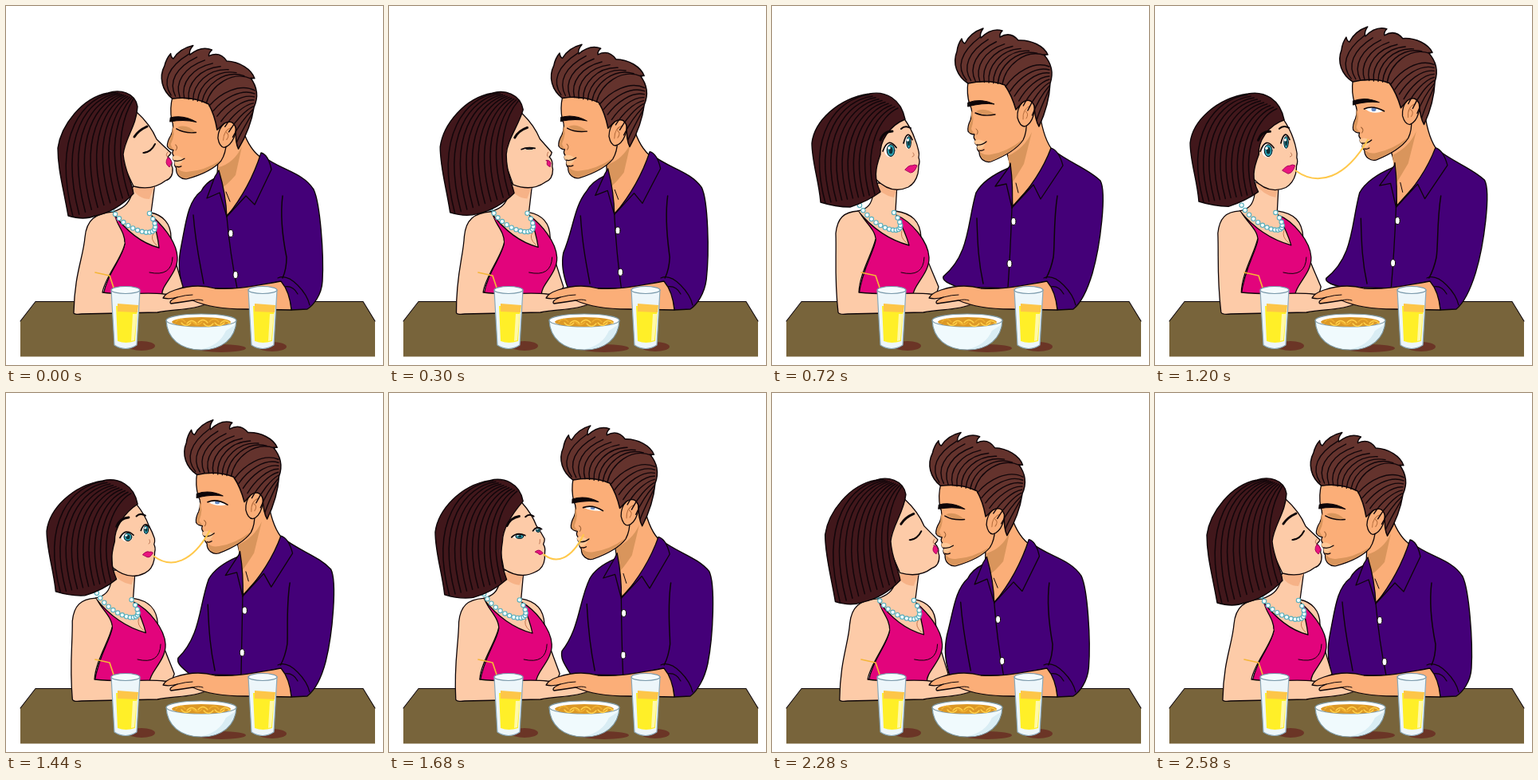
Recreate the animation shown at these times as an HTML page with a canvas. Size 473x450 px, loop 2.64 s.

```html
<!DOCTYPE html>
<html lang="en">
<head>
<meta charset="utf-8">
<title>Dinner kiss</title>
<style>
html, body { margin: 0; width: 100%; height: 100%; overflow: hidden; background: #fff; }
canvas { display: block; }
</style>
</head>
<body>
<canvas id="stage" width="473" height="450"></canvas>
<script>
const ctx = document.getElementById('stage').getContext('2d');
const LOOP = 2640, STEP = 60;
const INK = '#0d0508', SHADE = '#d9955c', TAN = '#fbae78', PEACH = '#fdcba8', SHIRT = '#440078',
  DRESS = '#e2047c', DARK_HAIR = '#41171b', BROWN_HAIR = '#64332d', NOODLE = '#ffc84a';

// Timeline tracks: [time, value] pairs, linear in between
const LEAN = [[0, 0], [180, 0], [480, .6], [720, 1], [1200, 1.06], [1680, .6], [1740, .55], [2040, .17], [2400, .03], [2580, 0]];
const SWAY = [[0, 0], [180, 0], [480, 7], [720, 0], [1200, -5], [1680, 2], [2040, 5], [2580, 0]];
const HER_EYES = [[0, 0], [240, 0], [480, .5], [720, 1], [1200, 1], [1680, .35], [1920, 0]];
const HIS_EYES = [[0, 0], [900, 0], [1200, 1], [1680, .5], [1920, 0]];
const NOODLE_ON = 960, NOODLE_OFF = 2160;

function at(track, t) {
  const i = track.findIndex(k => k[0] > t);
  if (i < 0) return track[track.length - 1][1];
  const [t0, a] = track[i - 1], [t1, b] = track[i];
  return a + (b - a) * (t - t0) / (t1 - t0);
}

// Blend two paths of equal structure
function mix(a, b, k) {
  const numbers = /-?\d+(\.\d+)?/g, target = b.match(numbers);
  let i = 0;
  return a.replace(numbers, v => (+v + (target[i++] - v) * k).toFixed(2));
}

function shape(d, fill, width = 1.3, stroke = INK) {
  const path = new Path2D(d);
  if (fill) { ctx.fillStyle = fill; ctx.fill(path); }
  if (width) { ctx.lineWidth = width; ctx.strokeStyle = stroke; ctx.stroke(path); }
}
const line = (d, width = 1.3, color = INK) => shape(d, null, width, color);

function oval(x, y, rx, ry, fill, width = 0, stroke = INK) {
  ctx.beginPath();
  ctx.ellipse(x, y, rx, ry, 0, 0, 7);
  ctx.fillStyle = fill;
  ctx.fill();
  if (width) { ctx.lineWidth = width; ctx.strokeStyle = stroke; ctx.stroke(); }
}

function strands(first, last, count, width = 1.4) {
  for (let i = 0; i <= count; i++) line(mix(first, last, i / count), width, '#12060a');
}

function table() {
  shape('M37 371H448L463 395V439.5H18V395Z', '#78643b', 0);
  line('M18 395L37 370.5H448L463 395', 1.1);
  oval(170, 426, 17, 6, '#6b3526');
  oval(270, 429, 31, 5, '#6b3526');
  oval(334, 427, 18, 6, '#6b3526');
}

function glass(x) {
  ctx.save();
  ctx.translate(x, 0);
  shape('M-18 356L-14 425Q0 434 14 425L18 356Z', '#edf6fa', 1.2, '#8aa8b8');
  shape('M-12 376H15L12 420Q0 424 -10 420Z', '#ffef28', 0);
  shape('M-10 373L16 375L15 384L-10 383Z', '#fdc648', 0);
  shape('M9 386H14L11 419L7 420Z', '#fff9a8', 0);
  oval(0, 356, 18, 4.5, '#f5fbfd', 1.2, '#7898aa');
  ctx.restore();
}

function bowl() {
  shape('M201 394C202 417 219 431 245 431C271 431 288 417 289 394Z', '#f0fafd', 1.2, '#7f9ba6');
  shape('M276 407C270 420 260 427 246 430C267 431 284 418 287 400Z', '#d9edf4', 0);
  oval(245, 394, 44, 8, '#fff', 1.2, '#7f9ba6');
  oval(245, 396, 37, 6, '#dc9826');
  for (let i = 0; i < 9; i++) {
    const x = 213 + i * 7;
    line(`M${x} ${396 + i % 3}q6 ${i % 2 ? 7 : -7} 12 0`, 1.3, i % 3 ? '#ffd04a' : '#f0b030');
  }
}

function herBody(p) {
  const m = (a, b) => mix(a, b, p);
  shape(m('M160 222L158 235C154 249 146 254 134 258C140 300 150 330 140 372L212 366L222 352C214 325 209 310 207 290C207 272 196 262 182 259L187 222Z',
    'M128 222L127 235C125 249 120 254 108 257C110 300 120 330 120 372L205 366L209 352C198 325 190 310 187 290C186 270 176 260 155 257L157 222Z'), PEACH);
  shape(m('M158 228L187 226Q182 235 180 242Q166 242 158 228Z', 'M127 222L157 228Q154 236 153 240Q137 237 127 222Z'), '#f6b287', 0);
  shape(m('M133 258C140 275 150 285 149 298C147 315 127 335 122 362L196 362C194 350 216 335 215 315C214 295 196 275 183 263Q190 285 192 303Q160 295 133 258Z',
    'M108 257C118 272 131 282 130 294C128 308 113 330 109 362L177 362C177 350 198 335 197 315C196 295 175 270 156 262Q168 285 172 300Q135 290 108 257Z'), DRESS);
  line(m('M180 334Q208 340 209 315', 'M162 334Q190 341 191 315'), 1);
  line(m('M185 285Q180 292 189 300', 'M163 282Q160 290 169 297'), 1, '#c57850');
  shape(m('M134 258C112 260 101 268 99 290C97 315 86 335 85 384C84 386 88 387 95 386L190 384C212 380 235 381 250 374C235 366 215 362 198 361C175 358 150 363 121 359C124 340 146 315 149 298',
    'M108 257C90 258 82 266 80 285C81 315 78 340 83 384C84 386 88 387 95 386L190 384C212 380 235 381 250 374C235 366 215 362 198 361C175 358 150 363 109 359C110 335 126 310 130 292'), PEACH);
  const [x0, y0, x1, y1, x2, y2, x3, y3] =
    m('133 255 151 286 207 298 180 260', '110 250 130 283 181 295 153 259').split(' ').map(Number);
  for (let i = 0; i <= 15; i++) {
    const k = i / 15, n = 1 - k;
    const bezier = (a, b, c, d) => n * n * n * a + 3 * n * n * k * b + 3 * n * k * k * c + k * k * k * d;
    oval(bezier(x0, x1, x2, x3), bezier(y0, y1, y2, y3), 2.7, 2.7, '#f2ffff', 1.1, '#58aebc');
  }
}

function hisBody(p) {
  const m = (a, b) => mix(a, b, p);
  shape(m('M322 188C345 206 372 208 386 230C394 247 399 310 397 345C396 362 386 375 378 380L358 381C356 365 350 352 341 346L300 354L222 354C215 330 217 315 220 300C226 270 228 245 245 232Q250 222 262 216Z',
    'M352 180C372 196 397 204 412 219C420 234 412 300 402 335C396 355 388 372 378 380L358 381C356 365 350 352 341 346L300 354L232 352C225 349 213 345 215 339C248 312 245 272 256 234Q266 216 297 203Z'), SHIRT, 1.4);
  shape(m('M266 190L265 212L277 263L300 238L323 192Q306 182 297 155L274 150Z',
    'M293 178L299 199L302 251L327 223L353 182Q341 168 336 135L314 130Z'), TAN);
  shape(m('M267 202Q286 197 296 176L288 212Q276 226 270 228Z',
    'M296 188Q317 178 326 158L316 198Q304 218 301 222Z'), SHADE, 0);
  line(m('M276 233L281 245', 'M306 222L309 234'), 1);
  shape(m('M262 214L252 241L268 234L277 264Q276 236 267 206Z', 'M298 201L280 226L294 223L301 253Q303 228 299 197Z'), SHIRT);
  shape(m('M320 184Q329 186 333 205L312 249L301 238L277 264Q306 228 320 184Z',
    'M350 178Q360 181 365 200L337 242L328 224L301 253Q336 216 350 178Z'), SHIRT);
  line(m('M277 264Q281 310 290 354', 'M301 253Q299 310 296 353'));
  line(m('M347 238C343 270 349 300 352 315Q352 330 347 341', 'M358 238C353 270 355 300 353 315Q350 330 344 341'), 1.5);
  line(m('M235 262C238 300 243 320 248 348', 'M257 266C258 300 259 320 265 348'), 1.4);
  line('M341 341Q352 336 366 350Q378 362 381 375M349 352Q360 350 366 361', 1.2);
  const buttons = m('282 285 288 337', '303 270 298 323').split(' ').map(Number);
  for (let i = 0; i < 4; i += 2) oval(buttons[i], buttons[i + 1], 3, 4.5, '#fff', 1);
}

function hisHead(p, open) {
  const back = 1 - p;
  ctx.save();
  ctx.translate(289 - 41 * back, 130 + 23.5 * Math.sin(back * Math.PI / 2));
  ctx.rotate(back * Math.PI / 30);
  ctx.translate(-290, -130);
  shape('M247 95C245 108 247 117 249 124C253 130 252 137 250 143Q246 151 247 157Q250 161 255 161Q253 165 256 168Q254 172 259 175Q257 179 261 183C261 192 269 197 276 195C291 189 307 181 316 168Q321 158 320 145L300 94Z', TAN);
  shape('M262 183C262 191 269 196 276 194C291 188 307 180 316 167Q296 183 276 186Q268 188 262 183Z', SHADE, 0);
  shape('M251 131Q256 140 251 154Q253 159 256 160L249 159Q246 154 251 142Z', SHADE, 0);
  shape('M309 140C308 124 319 113 328 119C334 128 328 148 318 151Q312 151 309 140Z', TAN);
  line('M316 142Q315 129 325 125M319 132Q324 135 320 141', 1, '#b56d3d');
  shape('M247 97C233 88 227 72 233 57Q234 48 239 41Q240 46 243 47C248 37 257 31 266 28Q261 35 263 40C271 32 280 28 290 31Q286 35 287 39C297 33 305 37 310 43C326 42 342 50 347 61L342 61C352 72 354 85 350 97C349 117 343 136 336 151Q331 143 330 125Q325 114 315 121L307 130Q302 112 293 99Q272 91 247 97Z', BROWN_HAIR, 1.5);
  strands('M245 93C232 77 237 58 262 39', 'M290 98C294 75 318 53 344 62', 8);
  strands('M294 101C306 84 329 68 349 76', 'M333 143C337 130 344 115 349 104', 7);
  shape('M247 121Q263 115 280 123Q265 121 247 126Z', INK, 1);
  if (open > 0) {
    shape(`M262 131Q272 ${132 + 7 * open} 285 134Q273 126 262 131Z`, '#fff', 0);
    oval(273, 131.5, 3, 2.6 * open, '#6688c0');
    line('M261 131Q272 126 286 134', 1.7);
  } else {
    shape('M257 132Q268 126 281 136Q268 139 257 132Z', SHADE, 0);
    line('M256 134Q267 139 281 136', 1.4);
  }
  line('M257 154Q261 157 258 161', 1, '#9a5f34');
  shape('M255 169Q261 165 269 171Q266 180 260 180Q257 178 259 175Q254 172 255 169Z', '#ffc795', 0);
  line('M258 174Q264 175 270 170', 1.3);
  line('M261 181Q264 182 267 180', 1.3);
  ctx.restore();
}

function eye(x, y, r, open) {
  const h = 8.5 * open;
  if (open > .1) {
    oval(x, y, r, h, '#fff');
    oval(x + r * .15, y, r * .7, h * .88, '#28a0b2', 1);
    oval(x + r * .15, y, r * .35, h * .5, '#0c3038');
    oval(x - r * .15, y - h * .35, 1.7, 1.7 * open, '#fff');
    line(`M${x - r - 2} ${y + 1}Q${x - r * .3} ${y - 2.1 * h} ${x + r + 1} ${y - h * .4}`, 1.7);
  } else {
    line(`M${x - r} ${y + 6}Q${x + 2} ${y + 5} ${x + r} ${y - 5}`, 2);
    line(`M${x - 3} ${y + 5}l-5 1`, 1.3);
  }
}

function herHead(p, sway, open) {
  const m = (a, b) => mix(a, b, p);
  const v = (a, b) => a + (b - a) * p;
  ctx.save();
  ctx.translate(sway, 0);
  shape(m('M155 125L164 133C174 142 183 153 189 167Q199 177 207 184Q206 187 203 189Q207 192 208 197Q207 200 209 203Q210 216 200 219C190 227 176 230 160 226L143 190Z',
    'M150 132L165 140C170 147 175 154 179 166Q182 173 184 182Q185 185 184 190Q186 195 184 200Q184 205 183 210Q180 222 171 227C156 234 142 229 130 217L130 180Z'), PEACH);
  shape(m('M165 126C162 108 142 104 128 109C95 115 69 150 65 178C65 205 72 228 78 263Q98 269 112 263Q138 258 160 235C157 217 149 207 147 186C149 166 164 150 165 126Z',
    'M167 142C162 116 142 106 122 110C82 116 53 145 50 172C50 195 59 220 61 246Q80 252 98 252Q120 245 136 233C128 217 129 205 136 186C135 170 147 150 167 142Z'), DARK_HAIR, 1.4);
  strands(m('M138 108C98 113 57 160 84 264', 'M122 111C82 116 43 160 67 247'),
    m('M160 116C151 131 132 170 154 238', 'M158 128C137 137 113 177 129 236'), 9, 1.5);
  line(m('M161 164Q166 156 177 151', 'M136 168Q140 157 151 157'), 3);
  if (p > .35) {
    line(m('M180 157Q184 153 188 157', 'M162 154Q167 149 174 153'), 2);
    eye(v(205, 171), v(173, 171), 4, open);
  }
  eye(v(180, 148), v(178, 181), 7, open);
  line(m('M203 183Q199 188 203 189', 'M177 184Q180 188 176 189'), 1, '#bd7654');
  shape(m('M203 190Q206 190 208 196Q206 200 205 202Q198 197 203 190Z',
    'M167 205Q172 199 176 200Q179 198 182 200Q179 209 174 209Q170 208 167 205Z'), '#ea147f', 1, '#a30758');
  line(m('M202 196L207 197', 'M168 205Q175 203 181 202').replace(/L.*/, ''), 1, '#7a0040');
  ctx.restore();
}

function hands() {
  shape('M345 345C315 350 290 356 262 354C245 349 230 350 212 356Q200 360 197 366Q205 368 215 365Q203 370 207 373Q222 371 234 369C250 376 270 380 300 380L358 381Q356 358 345 345Z', TAN);
  line('M215 365Q226 362 234 362M234 369Q242 367 247 369', 1);
}

function noodle(p, sway) {
  const x = 206 - 23 * p + sway, y = 197 + 9 * p;
  const endX = 214 + 50 * p, endY = 191 - 22 * p, w = endX - x;
  line(`M${x} ${y}C${x + .31 * w} ${y + .19 * w + 3} ${x + .69 * w} ${y + .07 * w + 3} ${endX} ${endY}`, 2, NOODLE);
}

function draw(now) {
  const t = Math.floor(now % LOOP / STEP) * STEP;
  const lean = at(LEAN, t), sway = at(SWAY, t);
  ctx.fillStyle = '#fff';
  ctx.fillRect(0, 0, 473, 450);
  ctx.lineJoin = ctx.lineCap = 'round';
  table();
  hisBody(lean);
  herBody(lean);
  hisHead(lean, at(HIS_EYES, t));
  herHead(lean, sway, at(HER_EYES, t));
  if (t >= NOODLE_ON && t < NOODLE_OFF) noodle(lean, sway);
  hands();
  line('M112 334L130 338L136 356', 1.7, '#f5b637');
  glass(150);
  glass(322);
  bowl();
}

const start = performance.now();
function tick() {
  draw(performance.now() - start);
  requestAnimationFrame(tick);
}
tick();
</script>
</body>
</html>
```
